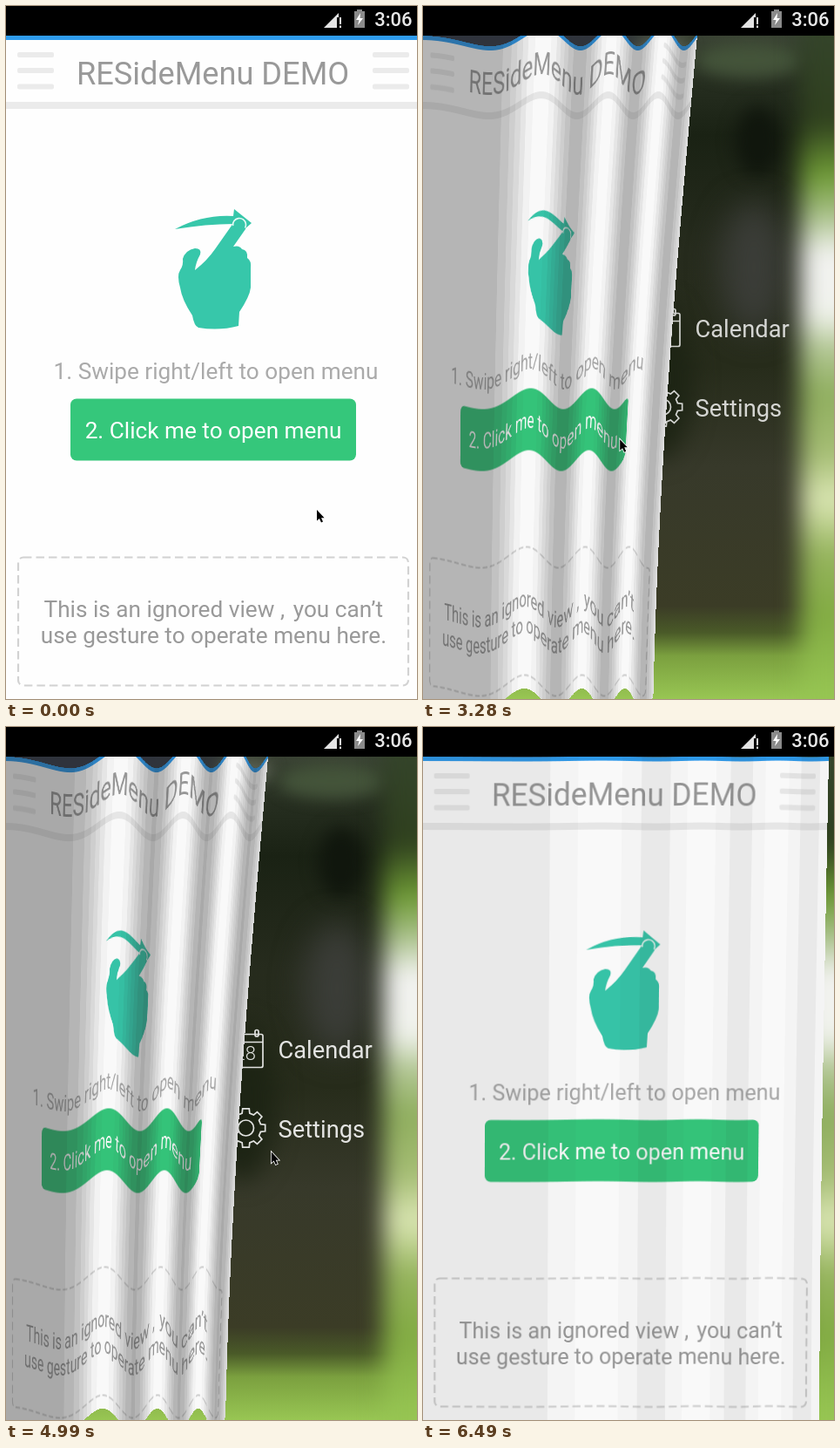
An HTML page with a canvas for the animation above (6.8 s loop, 472 by 795 pixels).

```html
<!DOCTYPE html>
<html>
<head>
<meta charset="utf-8">
<style>
html, body { margin: 0; width: 100%; height: 100%; overflow: hidden; background: #000; }
canvas { display: block; }
</style>
</head>
<body>
<canvas id="stage" width="472" height="795"></canvas>
<script>
const W = 472, H = 795, TOP = 34, LOOP = 6800, TAU = Math.PI * 2;
const SHEET = 478; // the cloth reaches a little past the right side of the stage
const stage = document.getElementById('stage').getContext('2d');

// time, x, y of the pointer tip
const POINTER = [
  [0, 357, 578], [240, 357, 578], [900, 433, 500], [1020, 436, 497], [1320, 436, 497],
  [1620, 441, 495], [1870, 438, 494], [2530, 365, 494], [2830, 333, 493], [3700, 127, 501],
  [3940, 85, 503], [4120, 85, 503], [4650, 213, 497], [5330, 396, 478], [6130, 440, 548],
  [6490, 398, 800]
];
// time, curtain width at the top, curtain width at the bottom
const CURTAIN = [
  [0, 472, 472], [2530, 472, 472], [2590, 462, 450], [2830, 388, 325], [3700, 247, 208],
  [3940, 236, 198], [4400, 236, 198], [4650, 239, 200], [4710, 243, 203], [5330, 371, 311],
  [6130, 466, 455]
];

function at(keys, t) {
  const i = keys.findIndex(k => k[0] > t);
  if (i < 0) return keys[keys.length - 1].slice(1);
  const a = keys[i - 1], b = keys[i], f = (t - a[0]) / (b[0] - a[0]);
  return [1, 2].map(n => a[n] + (b[n] - a[n]) * f);
}

function layer(draw) {
  const c = document.createElement('canvas');
  c.width = SHEET;
  c.height = H;
  if (draw) draw(c.getContext('2d'));
  return c;
}

function text(g, s, x, y, size, color, align = 'left', weight = 400) {
  g.font = `${weight} ${size}px Roboto, sans-serif`;
  g.textAlign = align;
  g.fillStyle = color;
  g.fillText(s, x, y);
}

function box(g, x, y, w, h, r) {
  g.beginPath();
  g.roundRect(x, y, w, h, r);
}

function fillPath(g, d, color) {
  g.fillStyle = color;
  g.fill(new Path2D(d));
}

const page = layer(g => {
  g.fillStyle = '#fefefe';
  g.fillRect(0, TOP, SHEET, H);
  g.fillStyle = '#2f9cee';
  g.fillRect(0, TOP, SHEET, 5);
  g.fillStyle = '#ebebeb';
  g.fillRect(0, 110, SHEET, 8);
  for (const x of [13, 421])
    for (const y of [53, 71, 89.5]) {
      box(g, x, y, 42, 6, 2);
      g.fill();
    }
  text(g, 'RESideMenu DEMO', 237.5, 89.5, 36.2, '#999', 'center');

  const teal = '#37c7aa';
  fillPath(g, 'M194 256Q226 239 261 241L262 233L282 249L266 263L261 250Q230 250 194 256Z', teal);
  fillPath(g, 'M259 252Q263 243 271 245Q278 249 275 256L261 276Q268 274 271 279Q278 280 277 289Q282 292 281 301L281 323Q280 333 268 351L267 367Q245 373 221 369Q216 367 214 355Q202 337 200 323Q196 309 200 303Q204 297 203 290Q206 280 217 278Q225 278 223 285Q218 294 217 303Q231 292 240 279Z', teal);
  g.strokeStyle = '#e6faf5';
  g.lineWidth = 1.6;
  g.beginPath();
  g.arc(268, 251, 7.5, Math.PI * 0.95, TAU * 1.08);
  g.stroke();

  text(g, '1. Swipe right/left to open menu', 241, 428, 26.2, '#aaa', 'center');
  box(g, 74, 450.5, 328, 71, 7);
  g.fillStyle = '#35c77b';
  g.fill();
  text(g, '2. Click me to open menu', 238, 496, 26.2, '#fff', 'center');

  box(g, 14, 632.5, 448, 147, 6);
  g.strokeStyle = '#d2d2d2';
  g.lineWidth = 2.2;
  g.setLineDash([9.5, 5]);
  g.stroke();
  text(g, 'This is an ignored view', 43.5, 700.5, 26.2, '#999');
  text(g, ',', 315, 700.5, 26.2, '#999');
  text(g, 'you can’t', 433, 700.5, 26.2, '#999', 'right');
  text(g, 'use gesture to operate menu here.', 238.5, 730.5, 26.2, '#999', 'center');
});

// Soft blurred garden behind the curtain
const garden = layer(g => {
  const fade = g.createLinearGradient(0, TOP, 0, H);
  [[0, '#3a4234'], [0.07, '#262e20'], [0.15, '#1a2214'], [0.32, '#262b1d'], [0.5, '#272c1b'],
   [0.65, '#37392a'], [0.86, '#3b3c26'], [0.9, '#4a5a28'], [0.935, '#7ba03f'], [1, '#98c653']]
    .forEach(([s, c]) => fade.addColorStop(s, c));
  g.fillStyle = fade;
  g.fillRect(0, 0, SHEET, H);
  const blob = (color, blur, x, y, rx, ry) => {
    g.filter = `blur(${blur}px)`;
    g.fillStyle = color;
    g.beginPath();
    g.ellipse(x, y, rx, ry, 0, 0, TAU);
    g.fill();
  };
  blob('#2f333d', 10, 60, 40, 200, 22);
  blob('#596052', 8, 275, 50, 32, 14);
  blob('#44543a', 9, 375, 62, 62, 20);
  blob('#10160d', 10, 385, 155, 26, 40);
  blob('#3b3d38', 18, 380, 300, 38, 75);
  blob('#1d2414', 14, 270, 430, 40, 90);
  const side = g.createLinearGradient(0, TOP, 0, H);
  [[0, '#34442a'], [0.13, '#2f401e'], [0.21, '#6e9a35'], [0.27, '#a8c088'], [0.33, '#f2f2f0'],
   [0.42, '#f0f2ec'], [0.47, '#b3c795'], [0.54, '#8fae5e'], [0.63, '#a5bd74'], [0.7, '#dbe6b4'],
   [0.78, '#96b45e'], [0.87, '#82ab43'], [1, '#97c653']]
    .forEach(([s, c]) => side.addColorStop(s, c));
  g.filter = 'blur(13px)';
  g.fillStyle = side;
  g.fillRect(433, 0, 120, H + 40);
});

function drawMenu(alpha) {
  const g = stage;
  g.save();
  g.globalAlpha = alpha;
  g.strokeStyle = '#fff';
  g.lineWidth = 1.7;
  box(g, 254.5, 352.5, 40.5, 38, 2);
  g.moveTo(255, 361.5);
  g.lineTo(295, 361.5);
  for (const x of [260, 286]) g.roundRect(x, 347.5, 4, 7.5, 2);
  g.stroke();
  text(g, '28', 274.8, 382, 22, '#fff', 'center', 300);

  g.beginPath();
  for (let i = 0; i < 8; i++)
    for (const [da, r] of [[-0.25, 17.5], [-0.17, 22.5], [0.17, 22.5], [0.25, 17.5]]) {
      const a = i * TAU / 8 + da;
      g.lineTo(275.5 + r * Math.cos(a), 460 + r * Math.sin(a));
    }
  g.closePath();
  g.moveTo(284.5, 460);
  g.arc(275.5, 460, 9, 0, TAU);
  g.stroke();
  text(g, 'Calendar', 312.5, 380, 27.3, '#fff');
  text(g, 'Settings', 312.5, 471, 27.3, '#fff');
  g.restore();
}

const folded = layer();
const fold = folded.getContext('2d');

function drawCurtain(top, bottom, p) {
  const height = 36 * p;
  const dark = (19 + 125 * p + 150 * p * p) * Math.min(1, p * 80);
  const step = Math.min(12, dark / 2);
  fold.clearRect(0, 0, SHEET, H);
  for (let x = 0; x < SHEET; x++) {
    // folds get tighter towards the free edge
    const phase = 3.54 * Math.pow((x + 0.5) / SHEET, 1.89), wave = Math.sin(TAU * phase);
    const dy = height * wave;
    const depth = phase < 0.25 ? 1 : (1 + wave) * 0.47;
    const shade = Math.max(5, Math.round(dark * depth / step) * step);
    fold.drawImage(page, x, TOP, 1, H - TOP, x, TOP + dy, 1, H - TOP);
    fold.fillStyle = `rgba(40,40,40,${shade / 214})`;
    fold.fillRect(x, TOP + dy, 1, H - TOP);
  }
  for (let y = TOP; y < H; y++) {
    const f = (y - TOP) / (H - TOP);
    const lean = 0.35 * f + 0.65 * Math.sin(f * Math.PI / 2);
    stage.drawImage(folded, 0, y, SHEET, 1, 0, y, top + (bottom - top) * lean, 1);
  }
}

function drawStatus() {
  const g = stage;
  g.fillStyle = '#000';
  g.fillRect(0, 0, W, TOP);
  fillPath(g, 'M365 25L382 8V13H380V25Z', '#e4e4e4');
  g.fillRect(383, 13, 2, 8);
  g.fillRect(383, 22.5, 2, 2.5);
  fillPath(g, 'M403 4H409V6H412V25H400V6H403Z', '#8a8a8a');
  fillPath(g, 'M407 8L402 16H405.5L404 22L410 14H406.5Z', '#fff');
  text(g, '3:06', 466.5, 23, 22, '#e8e8e8', 'right', 500);
}

const arrow = new Path2D('M0 0V12.5L2.9 10L5 14.5L7 13.6L5 9.2H8.6Z');
function drawPointer(x, y) {
  stage.save();
  stage.translate(x, y);
  stage.lineWidth = 1.6;
  stage.strokeStyle = '#fff';
  stage.stroke(arrow);
  stage.fillStyle = '#000';
  stage.fill(arrow);
  stage.restore();
}

function frame(now) {
  const t = now % LOOP;
  const [top, bottom] = at(CURTAIN, t), p = 1 - top / W;
  if (p > 0) {
    stage.drawImage(garden, 0, 0);
    drawMenu(Math.min(1, p * 2.4));
    drawCurtain(top, bottom, p);
  } else {
    stage.drawImage(page, 0, 0);
  }
  drawStatus();
  drawPointer(...at(POINTER, t));
  requestAnimationFrame(() => frame(performance.now() - start));
}
const start = performance.now();
frame(0);
</script>
</body>
</html>
```
